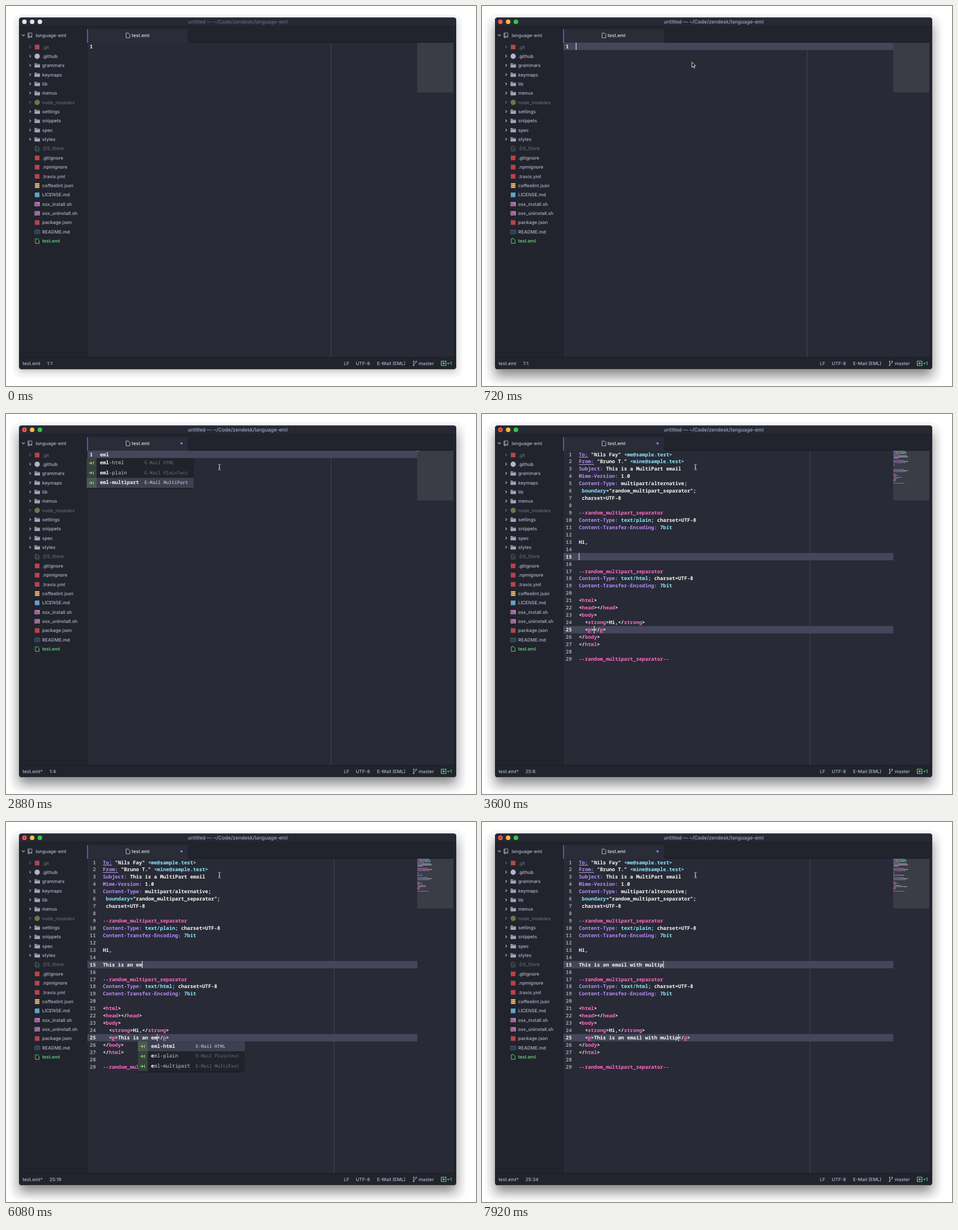
These frames come from a looping animation (832 px wide and 673 px high, 8000 ms). An HTML page:

```html
<!DOCTYPE html>
<html lang="en">
<head>
<meta charset="utf-8">
<title>Editor snippet</title>
<style>
  html, body { margin: 0; width: 100%; height: 100%; overflow: hidden; background: #fff; }
  #shadow { position: absolute; left: 23px; top: 20.5px; width: 774px; height: 623px; border-radius: 5px;
    box-shadow: 0 4px 10px rgba(0,0,0,.2), 0 4px 0 10px rgba(0,0,0,.03); }
  #shadow.active { box-shadow: 0 11px 20px rgba(0,0,0,.46), 0 0 1px rgba(0,0,0,.3), 0 9px 3px 15px rgba(0,0,0,.022); }
  svg { position: absolute; left: 0; top: 0; width: 832px; height: 673px; }
  text { white-space: pre; text-rendering: geometricPrecision; font: 500 8.2px Inter, sans-serif; }
  .code { font: 700 8.89px "Noto Sans Mono", monospace; }
  .name { font-weight: 500; }
  .hint { font: 500 8.02px "Noto Sans Mono", monospace; }
  .on { font-weight: 700; }
</style>
</head>
<body>
<div id="shadow"></div>
<svg viewBox="0 0 832 673">
  <g id="chrome"></g>
  <g id="title"></g>
  <g id="editor"></g>
  <g id="status"></g>
  <g id="popup"></g>
  <g id="mouse"></g>
</svg>
<script>
const LOOP = 8000, CHAR = 5.334, LINE = 12.94, TOP = 65;
const COLORS = { w: '#f8f8f2', p: '#b68cfa', c: '#8be9fd', k: '#ff6ac1', u: '#b68cfa', b: '#ff6ac1' };
const UI = '#b2b5c6', DIM = '#666a77', GREEN = '#6ddf8a', RED = '#b9434a';

const esc = s => s.replace(/&/g, '&amp;').replace(/</g, '&lt;');
const rect = (x, y, w, h, fill, extra = '') =>
  `<rect x="${x}" y="${y}" width="${w}" height="${h}" fill="${fill}" ${extra}/>`;
const circle = (x, y, r, fill) => `<circle cx="${x}" cy="${y}" r="${r}" fill="${fill}"/>`;
const stroke = (d, color, w = 1) => `<path d="${d}" fill="none" stroke="${color}" stroke-width="${w}"/>`;
const text = (x, y, s, fill, extra = '') => `<text x="${x}" y="${y}" fill="${fill}" ${extra}>${esc(s)}</text>`;

// Icons are drawn around the centre (55, y) of a tree row.
const icons = {
  folder: (y, c) => `<path d="M50.5 ${y - 3.8}h3.6l1 1.3h5v6.3h-9.6z" fill="${c}"/>` +
    stroke(`M51.2 ${y - 1.7}h8.2`, '#21242d', .6),
  square: (y, c) => rect(51, y - 4, 8.2, 8.2, c),
  circle: (y, c) => circle(55.2, y, 4.7, c),
  file: (y, c) => stroke(`M52 ${y - 4}h4.2l2.3 2.3v5.9h-6.5z`, c, .9),
  binary: (y, c) => icons.file(y, c) +
    stroke(`M53.8 ${y - 1.6}v1.8M56.4 ${y - 1.6}v1.8M53.8 ${y + 1.1}v1.8M56.4 ${y + 1.1}v1.8`, c, .9),
  database: (y, c) => [-3, 0, 3].map(d => rect(51, y + d - 1.3, 8.4, 2.5, c, 'rx="1.2"')).join(''),
  shell: (y, c) => rect(50.4, y - 3.8, 9.6, 7.8, c, 'rx=".6"') +
    stroke(`M52 ${y - 1.8}l1.7 1.6-1.7 1.6M55 ${y + 2}h2.8`, '#21242d', .9),
  book: (y, c) => stroke(`M50.6 ${y - 3}h9.2v6.4h-9.2zM55.2 ${y - 3}v6.4` +
    `M51.8 ${y - 1}h2M51.8 ${y + 1}h2M56.6 ${y - 1}h2M56.6 ${y + 1}h2`, c, .8)
};

const FOLDERS = 11;
const tree = [
  ['.git', 'square', RED, DIM], ['.github', 'circle', UI],
  ...['grammars', 'keymaps', 'lib', 'menus'].map(n => [n, 'folder', '#a3a6b8']),
  ['node_modules', 'circle', '#68784a', DIM],
  ...['settings', 'snippets', 'spec', 'styles'].map(n => [n, 'folder', '#a3a6b8']),
  ['.DS_Store', 'binary', DIM, DIM], ['.gitignore', 'square', RED], ['.npmignore', 'square', RED],
  ['.travis.yml', 'square', RED], ['coffeelint.json', 'database', '#f0b968'],
  ['LICENSE.md', 'square', '#62a5c4'], ['osx_install.sh', 'shell', '#b075a8'],
  ['osx_uninstall.sh', 'shell', '#b075a8'], ['package.json', 'square', RED],
  ['README.md', 'book', '#4f8199'], ['test.eml', 'file', GREEN, GREEN]
];

function treeRow([name, icon, color, label = UI], i) {
  const y = 72.6 + i * 16.36;
  const arrow = i < FOLDERS ? stroke(`M41.5 ${y - 2.4}l2.3 2.2-2.3 2.2`, label, 1.1) : '';
  return arrow + icons[icon](y, color) + text(64, y + 2.9, name, label);
}

function drawChrome() {
  const edge = '#191b22';
  return rect(23, 20.5, 774, 623, '#21242d', 'rx="4.5"') +
    '<path d="M23 36v-11q0-4.5 4.5-4.5h765q4.5 0 4.5 4.5v11z" fill="#262934"/>' +
    rect(23, 35.5, 774, .8, '#1b1d25') +
    rect(143.5, 65, 648.5, 557, '#282a36') + rect(143, 41, .8, 581, edge) +
    rect(323, 64.3, 469, .8, edge) + rect(23, 621.7, 774, .8, edge) +
    rect(144, 41, 179, 24, '#2a2c38') + rect(322.5, 41, .8, 24, edge) +
    rect(143.6, 41, 1.5, 24, '#5f70ff') +
    stroke('M212.5 48h4.3l2.4 2.4v5.9h-6.7z', '#c9cbd6', .9) +
    text(222.5, 55, 'test.eml', '#e2e3e8') +
    stroke('M28.4 50.5l2.4 2.4 2.4-2.4', UI, 1.1) +
    stroke('M38.8 47.8h7v7.6h-7zM40.5 47.8v6M38.8 53.7h7M40.5 55v2.3', UI, .9) +
    text(52.5, 55.2, 'language-eml', UI) + tree.map(treeRow).join('') +
    text(598, 636, 'LF', UI) + text(619.3, 636, 'UTF-8', UI) + text(656.8, 636, 'E-Mail (EML)', UI) +
    stroke('M721.7 630.5v5M726 630.5q0 2.5-4 3.5', UI, .9) +
    [[721.7, 629.6], [726, 629.6], [721.7, 636.4]].map(([x, y]) => circle(x, y, 1.2, UI)).join('') +
    text(730.5, 636, 'master', UI) +
    stroke('M770.5 629h8.3v7.8h-8.3zM774.65 630.7v4.4M772.4 632.9h4.5', GREEN, 1.1) +
    text(780.3, 636, '+1', GREEN);
}

// Each line is a list of segments split by "|"; the first letter names the colour.
const tag = (name, key = 'k') => `w<|${key}${name}|w>`;
const endTag = (name, key = 'k') => `w</|${key}${name}|w>`;
const part = type => ['k--random_multipart_separator', `pContent-Type:|c text/${type};|w charset=UTF-8`,
  'pContent-Transfer-Encoding:|c 7bit', ''];
const message = typed => [
  'uTo:|w "Nils Fay" |c<me@sample.test>', 'uFrom:|w "Bruno T." |c<mine@sample.test>',
  'pSubject:|w This is a MultiPart email', 'pMime-Version:|w 1.0',
  'pContent-Type:|w multipart/alternative;', 'c boundary=|w"random_multipart_separator";',
  'w charset=UTF-8', '',
  ...part('plain'), 'wHi,', '', 'w' + typed, '',
  ...part('html'), tag('html'), tag('head') + '|' + endTag('head'), tag('body'),
  'w  |' + tag('strong') + '|wHi,|' + endTag('strong'),
  'w  |' + tag('p', 'b') + '|w' + typed + '|' + endTag('p', 'b'),
  endTag('body'), endTag('html'), '', 'k--random_multipart_separator--'
].map(line => line ? line.split('|') : []);

function codeLine(parts, x, y) {
  let col = 0, under = '';
  const spans = parts.map(p => {
    const s = p.slice(1), key = p[0];
    if (key === 'u' || key === 'b')
      under += rect(x + col * CHAR, y + 1.7, s.length * CHAR, .8, key === 'u' ? '#d9c6fb' : COLORS.b);
    col += s.length;
    return `<tspan fill="${COLORS[key]}">${esc(s)}</tspan>`;
  });
  return `<text class="code" x="${x}" y="${y}">${spans.join('')}</text>` + under;
}

function miniLine(parts, row) {
  let col = 0, out = '';
  for (const p of parts) {
    for (const m of p.slice(1).matchAll(/\S+/g))
      out += rect(728 + (col + m.index) * .676, 65.4 + row * 2.02, m[0].length * .676, 1.1,
        COLORS[p[0]], 'opacity=".62"');
    col += p.length - 1;
  }
  return out;
}

function drawEditor(s) {
  const x = s.expanded ? 171.5 : 166.2, numberEnd = x - 12.5;
  const lines = s.expanded ? message(s.typed) : [s.typed ? ['w' + s.typed] : []];
  const carets = s.expanded ? [[14, s.typed.length], [24, s.typed.length + 5]] : [[0, s.typed.length]];
  const current = new Set(carets.map(c => c[0]));
  let out = rect(x + 409, 65, .9, 557, '#484a54');
  if (s.focused) for (const [row] of carets) out += rect(144, TOP + row * LINE, 584, 12.9, '#44475a');
  out += rect(728, 65, 64, 88, '#3a3c46');
  lines.forEach((parts, i) => {
    const y = TOP + i * LINE + 9.5;
    out += text(numberEnd, y, String(i + 1), current.has(i) ? '#f8f8f2' : '#a2a3a9', 'class="code" text-anchor="end"');
    out += codeLine(parts, x, y) + miniLine(parts, i);
  });
  if (s.caret) for (const [row, col] of carets)
    out += rect(x + col * CHAR - .1, TOP + row * LINE, 1, 12.9, '#f8f8f0');
  return out;
}

function drawTitle(s) {
  const lights = s.active ? ['#fc5b57', '#fdbc40', '#2fc84a'] : Array(3).fill('#e3e3e5');
  return lights.map((c, i) => circle(32.6 + i * 13.7, 28, 4, c)).join('') +
    (s.modified ? circle(32.6, 28, 1.3, '#6f120e') + circle(310.7, 52, 2.1, '#6582f0') : '') +
    text(410, 31, 'untitled — ~/Code/zendesk/language-eml', s.active ? '#a6a9b8' : '#666977',
      'text-anchor="middle" style="font-size:8.8px"');
}

function drawStatus(s) {
  const col = s.typed.length + (s.expanded ? 6 : 1);
  return text(29.3, 636, 'test.eml' + (s.modified ? '*' : ''), UI) +
    text(s.modified ? 77 : 72.8, 636, (s.expanded ? 25 : 1) + ':' + col, UI);
}

const snippets = [['eml-html', 'HTML'], ['eml-plain', 'PlainText'], ['eml-multipart', 'MultiPart']];

function drawPopup({ x, y, items, selected, prefix }) {
  const H = 17.6, left = x - 23.4, ix = left + 4;
  let out = rect(left, y + 1, 189.5, items.length * H + 1, '#15171d', 'rx="2" opacity=".6"');
  items.forEach((index, i) => {
    const [name, kind] = snippets[index], top = y + i * H, base = top + 11.2, cy = top + 8.8;
    const on = i === selected, mark = on ? 'on' : '';
    out += rect(left, top, 189.5, H, on ? '#3d404f' : '#21232c') +
      rect(left, top, 17.5, H, on ? '#4b5951' : '#38433f') +
      stroke(`M${ix} ${cy}h5M${ix + 3} ${cy - 2.2}l2.4 2.2-2.4 2.2M${ix + 8} ${cy - 2.8}v5.6`, '#93cb6c', 1.2) +
      `<text class="code name ${mark}" x="${x}" y="${base}" fill="${on ? '#f0f0f2' : '#c3c5cc'}">` +
      `<tspan class="on" fill="#fff">${name.slice(0, prefix)}</tspan>${name.slice(prefix)}</text>` +
      text(x + 78.8, base - .3, 'E-Mail ' + kind, on ? '#a0a2ad' : '#6c6f7a', `class="hint ${mark}"`);
  });
  return out;
}

const ALL = [0, 1, 2];
function popupAt(t) {
  if (t >= 1680 && t < 3600)
    return { x: 166.2, y: 78, items: ALL, selected: t < 2240 ? 0 : t < 2560 ? 1 : 2, prefix: t < 1760 ? 2 : 3 };
  if (t >= 6080 && t < 6480)
    return { x: 171.5 + 16 * CHAR, y: 388.6, selected: 0, prefix: t < 6160 ? 1 : 2,
      items: t < 6320 ? ALL : t < 6400 ? [1, 2] : [1] };
  return null;
}

function drawMouse(t) {
  if (t < 80) return '';
  if (t < 880) {
    const k = (1 - Math.min(1, (t - 80) / 480)) ** 2;
    return `<path transform="translate(${371.5 + 230 * k} ${99.3 + 560 * k})" ` +
      'd="M0 0v9.2l2.2-2 1.5 3.4 1.5-.7-1.5-3.2h3z" fill="#16171c" stroke="#f4f4f4" stroke-width=".9"/>';
  }
  const k = 1 - Math.min(1, (t - 880) / 160);
  return `<g transform="translate(${377.8 - 5 * k} ${94 + 6 * k})">` +
    stroke('M-2.5-5q2.5 0 2.5 1.5v7q0 1.5-2.5 1.5M2.5-5q-2.5 0-2.5 1.5v7q0 1.5 2.5 1.5M-1.2 1.5h2.4', '#c4c6ce', .9) + '</g>';
}

const first = { word: 'eml', times: [1520, 1680, 1760] };
const second = {
  word: 'This is an email with multip',
  times: [4080, 4240, 4320, 4480, 4560, 4640, 4800, 4880, 5040, 5200, 5840, 6000, 6080, 6240, 6320,
    6400, 6560, 6640, 6720, 6880, 6960, 7120, 7280, 7440, 7600, 7680, 7760, 7920]
};
const caretOff = [[0, 720], [1120, 1520], [2160, 2480], [2880, 3280], [4000, 4080], [5680, 5840]];

function stateAt(t) {
  const expanded = t >= 3600, { word, times } = expanded ? second : first;
  return {
    expanded,
    typed: word.slice(0, times.filter(k => k <= t).length),
    active: t >= 640,
    focused: t >= 720,
    modified: t >= 1920,
    caret: !caretOff.some(([from, to]) => t >= from && t < to)
  };
}

const shown = {};
function put(id, markup) {
  if (shown[id] === markup) return;
  shown[id] = markup;
  document.getElementById(id).innerHTML = markup;
}

function render(t) {
  const s = stateAt(t), popup = popupAt(t);
  document.getElementById('shadow').className = s.active ? 'active' : '';
  put('title', drawTitle(s));
  put('editor', drawEditor(s));
  put('status', drawStatus(s));
  put('popup', popup ? drawPopup(popup) : '');
  put('mouse', drawMouse(t));
}

put('chrome', drawChrome());
const start = performance.now();
(function tick() {
  render((performance.now() - start) % LOOP);
  requestAnimationFrame(tick);
})();
</script>
</body>
</html>
```
